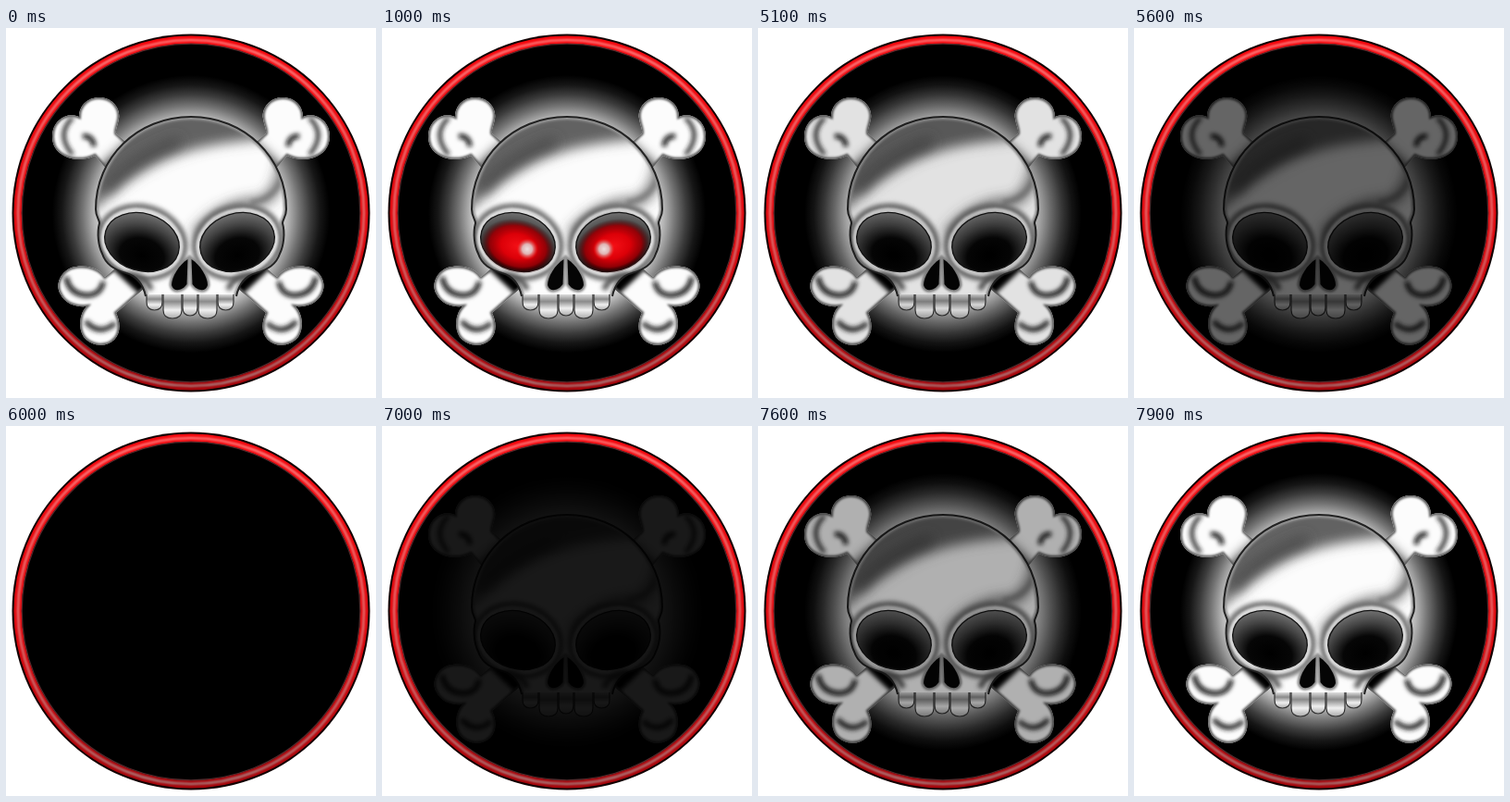
An HTML page for the animation above (9900 ms loop, 400x400 px).

```html
<!DOCTYPE html>
<html lang="en">
<head>
<meta charset="utf-8">
<title>Skull badge</title>
<style>
  html, body { margin: 0; width: 100%; height: 100%; overflow: hidden; background: #fff; }
  svg { display: block; width: 100vw; height: 100vh; }
</style>
</head>
<body>
<svg viewBox="0 0 400 400">
  <defs>
    <filter id="soft1" x="-50%" y="-50%" width="200%" height="200%"><feGaussianBlur stdDeviation=".8"/></filter>
    <filter id="soft2" x="-80%" y="-80%" width="260%" height="260%"><feGaussianBlur stdDeviation="2.4"/></filter>
    <filter id="soft7" x="-80%" y="-80%" width="260%" height="260%"><feGaussianBlur stdDeviation="7"/></filter>

    <linearGradient id="ringRed" x1="0" y1="0" x2="0" y2="1">
      <stop offset="0" stop-color="#f4080e"/><stop offset=".55" stop-color="#dc080e"/><stop offset="1" stop-color="#a4040a"/>
    </linearGradient>
    <linearGradient id="ringShine" x1="0" y1="0" x2="0" y2="1">
      <stop offset="0" stop-color="#ff8c8c"/><stop offset=".5" stop-color="#e67c7c"/><stop offset="1" stop-color="#a88484"/>
    </linearGradient>
    <radialGradient id="halo">
      <stop offset=".62" stop-color="#e8e8e8"/><stop offset=".7" stop-color="#b4b4b4"/><stop offset=".78" stop-color="#747474"/>
      <stop offset=".86" stop-color="#3c3c3c"/><stop offset=".93" stop-color="#161616"/><stop offset="1" stop-color="#000"/>
    </radialGradient>
    <radialGradient id="socket" cx=".55" cy=".72" r=".7">
      <stop offset="0" stop-color="#000"/><stop offset=".42" stop-color="#060606"/>
      <stop offset=".75" stop-color="#444"/><stop offset="1" stop-color="#6c6c6c"/>
    </radialGradient>
    <radialGradient id="iris">
      <stop offset="0" stop-color="#f41016"/><stop offset=".45" stop-color="#dc0008"/>
      <stop offset=".75" stop-color="#980006" stop-opacity=".95"/><stop offset="1" stop-color="#300" stop-opacity="0"/>
    </radialGradient>
    <radialGradient id="pupil">
      <stop offset="0" stop-color="#eee0e0"/><stop offset=".45" stop-color="#e0b4b4"/>
      <stop offset=".75" stop-color="#e05050" stop-opacity=".65"/><stop offset="1" stop-color="#f00" stop-opacity="0"/>
    </radialGradient>
    <linearGradient id="tooth" x1="0" y1="0" x2="0" y2="1">
      <stop offset="0" stop-color="#ddd"/><stop offset=".3" stop-color="#8a8a8a"/>
      <stop offset=".65" stop-color="#f0f0f0"/><stop offset="1" stop-color="#aaa"/>
    </linearGradient>

    <path id="head" d="M151 290C148 276 141 268 130 265C117 261 108 256 104 244C100 236 98 222 101 211C101 207 97 204 97 196
      C97 140 142 96 200 96C258 96 303 140 303 196C303 204 299 207 299 211C302 222 300 236 296 244
      C292 256 283 261 270 265C259 268 252 276 249 290"/>
    <clipPath id="headClip"><use href="#head"/></clipPath>

    <path id="topBone" d="M112 156L96 138C84 144 68 143 58 135C47 126 48 108 57 100C63 94 72 93 79 96
      C79 84 88 75 101 75C115 75 124 87 122 98C121 105 118 110 119 114L138 131Z"/>
    <clipPath id="topClip"><use href="#topBone"/></clipPath>
    <path id="lowBone" d="M126 254L107 269C98 257 82 256 71 259C58 264 53 278 59 288C64 298 75 302 87 301
      C79 309 78 325 84 334C92 344 108 346 117 337C125 329 123 316 119 308L152 279Z"/>
    <clipPath id="lowClip"><use href="#lowBone"/></clipPath>

    <g id="bones">
      <use href="#topBone" fill="#fcfcfc"/>
      <g clip-path="url(#topClip)" fill="none">
        <path d="M72 97Q53 115 72 137" stroke="#222" stroke-width="4" filter="url(#soft2)"/>
        <path d="M83 117Q94 116 95 128" stroke="#111" stroke-width="5" filter="url(#soft2)"/>
        <path d="M104 160L144 124" stroke="#111" stroke-width="15" filter="url(#soft7)"/>
        <use href="#topBone" stroke="#5a5a5a" stroke-width="4" filter="url(#soft1)"/>
      </g>
      <use href="#lowBone" fill="#fcfcfc"/>
      <g clip-path="url(#lowClip)" fill="none">
        <path d="M65 269Q68 288 88 289Q103 288 105 274" stroke="#0c0c0c" stroke-width="5" filter="url(#soft2)"/>
        <path d="M86 317Q101 334 118 319" stroke="#1a1a1a" stroke-width="5" filter="url(#soft2)"/>
        <path d="M118 251L155 286" stroke="#000" stroke-width="18" filter="url(#soft2)"/>
        <use href="#lowBone" stroke="#5a5a5a" stroke-width="4" filter="url(#soft1)"/>
      </g>
    </g>

    <g id="socketLeft">
      <g transform="rotate(17 147 231.5)" fill="none">
        <ellipse cx="147" cy="231.5" rx="47" ry="38" stroke="#666" stroke-width="6" filter="url(#soft2)"/>
        <ellipse cx="147" cy="231.5" rx="43" ry="34" stroke="#ddd" stroke-width="3" filter="url(#soft1)"/>
      </g>
      <ellipse cx="147" cy="231.5" rx="41" ry="31" transform="rotate(17 147 231.5)" fill="url(#socket)" stroke="#161616" stroke-width="1.4"/>
    </g>
    <g id="glowLeft">
      <ellipse cx="147" cy="236" rx="41" ry="29" transform="rotate(13 147 236)" fill="url(#iris)"/>
      <circle cx="157" cy="239" r="12" fill="url(#pupil)"/>
    </g>
    <path id="nostril" d="M196.5 250C187 256 179 269 179 278C181 286 191 284 195.5 277Z"/>
    <g id="faceLeft">
      <path d="M130 267Q150 266 157 283" fill="none" stroke="#555" stroke-width="6" filter="url(#soft2)"/>
      <use href="#nostril" fill="#555" stroke="#888" stroke-width="5" filter="url(#soft1)"/>
      <use href="#nostril" fill="#050505"/>
    </g>
  </defs>

  <circle cx="200" cy="200" r="193.5" fill="#120203"/>
  <circle cx="200" cy="200" r="187.3" fill="#000" stroke="url(#ringRed)" stroke-width="8.4"/>
  <circle cx="200" cy="200" r="187" fill="none" stroke="url(#ringShine)" stroke-width="2.2" filter="url(#soft1)"/>
  <circle cx="200" cy="200" r="182.8" fill="none" stroke="#54292b" stroke-width="1.2"/>

  <g id="skull">
    <circle cx="200" cy="201" r="150" fill="url(#halo)"/>
    <use href="#bones"/>
    <use href="#bones" transform="matrix(-1 0 0 1 400 0)"/>
    <use href="#head" fill="#fcfcfc"/>
    <g clip-path="url(#headClip)" fill="none">
      <path d="M88 205Q116 172 160 148Q204 124 282 120L250 88L180 86L100 120Z" fill="#626262" filter="url(#soft7)"/>
      <path d="M108 176Q132 142 188 122" stroke="#4a4a4a" stroke-width="10" filter="url(#soft7)"/>
      <path d="M300 128Q301 176 276 188Q232 188 204 224" stroke="#4a4a4a" stroke-width="8" filter="url(#soft7)"/>
      <path d="M298 160Q292 185 264 189" stroke="#777" stroke-width="5" filter="url(#soft2)"/>
      <use href="#head" stroke="#999" stroke-width="6" filter="url(#soft1)"/>
      <use href="#socketLeft"/>
      <use href="#socketLeft" transform="matrix(-1 0 0 1 397 0)"/>
      <use href="#faceLeft"/>
      <use href="#faceLeft" transform="matrix(-1 0 0 1 397 0)"/>
    </g>
    <use href="#head" fill="none" stroke="#222" stroke-width="2"/>
    <g id="teeth" fill="url(#tooth)" stroke="#333" stroke-width="1.2"></g>
    <g id="eyes" opacity="0">
      <use href="#glowLeft"/>
      <use href="#glowLeft" transform="matrix(-1 0 0 1 397 0)"/>
    </g>
  </g>
</svg>
<script>
  const LOOP = 9900;
  const RAMP = 1000;

  // Tooth centre, width and lower edge
  const teeth = [[160.5, 17, 305], [237.5, 17, 305], [180, 20, 314], [218, 20, 314], [199, 16, 311]];
  document.getElementById('teeth').innerHTML = teeth.map(([x, w, bottom]) => {
    const left = x - w / 2, right = x + w / 2;
    return `<path d="M${left} 288V${bottom - 9}Q${left} ${bottom} ${x} ${bottom}T${right} ${bottom - 9}V288"/>`
      .replace(`T${right}`, `Q${right} ${bottom} ${right}`);
  }).join('');

  // Each ramp [start, from, to] changes in ten even steps, the first one at its start
  function fade(id, ramps) {
    const frames = [{ offset: 0, opacity: ramps[0][1] }];
    for (const [start, from, to] of ramps) {
      frames.push(
        { offset: start / LOOP, opacity: from, easing: 'steps(10, start)' },
        { offset: (start + RAMP) / LOOP, opacity: to });
    }
    frames.push({ offset: 1, opacity: ramps[ramps.length - 1][2] });
    document.getElementById(id).animate(frames, { duration: LOOP, iterations: Infinity });
  }

  fade('eyes', [[100, 0, 1], [4000, 1, 0]]);
  fade('skull', [[5100, 1, 0], [7000, 0, 1]]);
</script>
</body>
</html>
```
